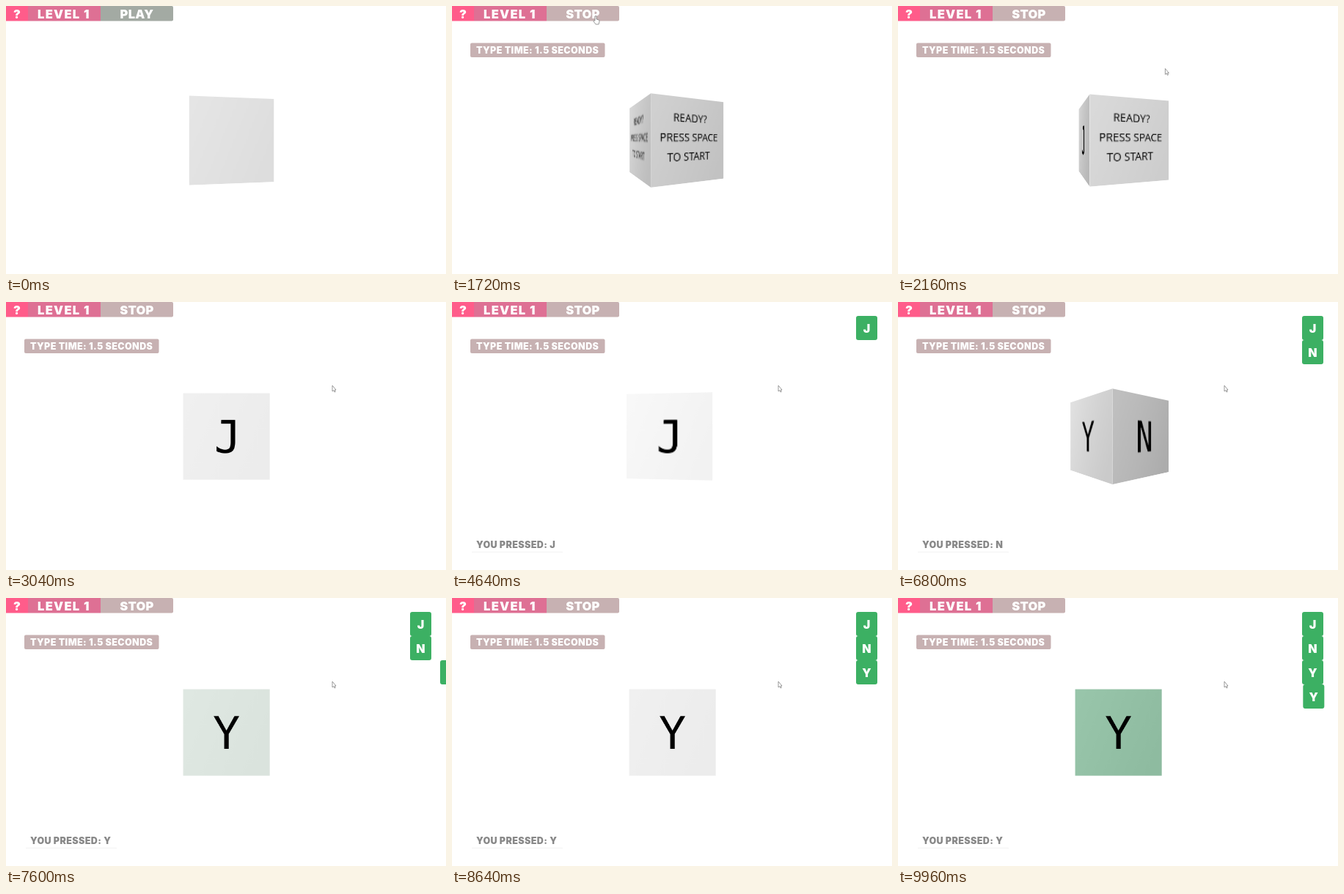
An HTML page with a canvas that plays this animation: 600x366 px, repeating every 10 s.

```html
<!DOCTYPE html>
<html lang="en">
<head>
<meta charset="utf-8">
<title>Typing cube</title>
<style>
  html, body { margin: 0; width: 100%; height: 100%; overflow: hidden; background: #fff; }
  #scene { position: absolute; left: 0; top: 0; width: 600px; height: 366px; overflow: hidden;
    perspective: 243px; perspective-origin: 300px 183px; }
  .face { position: absolute; left: 252.5px; top: 135.5px; width: 95px; height: 95px; backface-visibility: hidden; }
  #ui { position: absolute; left: 0; top: 0; }
</style>
</head>
<body>
<div id="scene">
  <canvas class="face" width="196" height="196"></canvas>
  <canvas class="face" width="196" height="196"></canvas>
</div>
<canvas id="ui" width="600" height="366"></canvas>
<script>
const LOOP = 10000, CLICK = 1560, TURN = 500, REST_ANGLE = 9;
const READY = 'READY?|PRESS SPACE|TO START ';
const GREEN = '#3cb063', PINK_GREY = '#c7b1b2';

// dir 1 turns the cube to the right, -1 to the left
const turns = [
  { at: 1640, dir: 1, from: READY, to: READY, start: REST_ANGLE },
  { at: 2080, dir: 1, from: READY, to: 'J' },
  { at: 4605, dir: -1, from: 'J', to: 'N' },
  { at: 6668, dir: 1, from: 'N', to: 'Y' },
  { at: 8650, dir: -1, from: 'Y', to: 'Y' }
];
const presses = [[3920, 'J'], [5480, 'N'], [7560, 'Y'], [9560, 'Y']];
const pointerPath = [
  [320, 594, 232], [720, 390, 96], [1040, 140, 16], [1320, 196, 14],
  [1760, 196, 14], [2520, 507, 146], [2960, 445, 114]
];

const faces = [...document.querySelectorAll('.face')];
const ui = document.getElementById('ui').getContext('2d');
const clamp = v => Math.max(0, Math.min(1, v));
const smooth = p => p * p * (3 - 2 * p);

// cubic-bezier(.25, .1, .25, 1)
function ease(x) {
  if (x <= 0 || x >= 1) return clamp(x);
  let lo = 0, hi = 1, u;
  for (let i = 0; i < 24; i++) {
    u = (lo + hi) / 2;
    const bx = .75 * u * (1 - u) + u ** 3;
    if (bx < x) lo = u; else hi = u;
  }
  return .3 * (1 - u) ** 2 * u + 3 * (1 - u) * u * u + u ** 3;
}

function drawLetter(g, letter) {
  const baseline = 18.5;
  g.font = '51px "DejaVu Sans Mono", monospace';
  if (letter === 'J') {
    g.textAlign = 'left';
    g.fillText('J', 10 - g.measureText('J').actualBoundingBoxRight, baseline);
    g.fillRect(-6, -18.7, 15, 4.3);
  } else {
    g.textAlign = 'center';
    g.fillText(letter, 0, baseline);
  }
}

function drawFace(canvas, angle, text, flash, blur) {
  canvas.style.transform = `rotateY(${angle}deg) translateZ(47.5px)`;
  const g = canvas.getContext('2d');
  g.setTransform(2, 0, 0, 2, 98, 98);
  const lean = angle + 6;
  const tone = 246 - (lean > 0 ? 1.4 : .75) * Math.abs(lean);
  const spread = 2 + 12 * Math.abs(Math.sin(angle * Math.PI / 180));
  const shade = g.createLinearGradient(-49, -20, 49, 20);
  [1, -1].forEach((side, i) => {
    const mix = [145, 191, 163].map(c =>
      Math.round(tone + (c - tone) * flash + side * (spread + 3 * flash)));
    shade.addColorStop(i, `rgb(${mix})`);
  });
  g.fillStyle = shade;
  g.fillRect(-49, -49, 98, 98);
  g.fillStyle = '#000';
  if (text.length === 1) return drawLetter(g, text);
  g.filter = blur > .05 ? `blur(${blur * 2}px)` : 'none';
  g.font = '13px "Open Sans", "Noto Sans", sans-serif';
  g.textAlign = 'center';
  text.split('|').forEach((line, i) => g.fillText(line, 0, -21 + i * 22));
  g.filter = 'none';
}

function drawCube(t) {
  let angle = REST_ANGLE, front = t < CLICK ? '' : READY, next = null;
  turns.forEach((turn, i) => {
    if (t < turn.at) return;
    const p = (t - turn.at) / TURN, start = turn.start || 0;
    const following = turns[i + 1];
    if (p >= 1 || (following && t >= following.at)) {
      angle = 0; front = turn.to; next = null;
    } else {
      angle = turn.dir * (start + (90 - start) * ease(p));
      front = turn.from;
      next = { angle: angle - turn.dir * 90, text: turn.to, blur: 1 - ease(p) };
    }
  });
  const press = presses.filter(([at]) => t >= at).pop();
  const age = press ? t - press[0] : LOOP;
  const flash = age < 700 ? Math.sin(Math.PI * age / 700) : 0;
  drawFace(faces[0], angle, front, flash, 0);
  faces[1].style.display = next ? 'block' : 'none';
  if (next) drawFace(faces[1], next.angle, next.text, 0, next.blur);
}

function box(x, y, w, h, color, radius = 0) {
  ui.fillStyle = color;
  ui.beginPath();
  ui.roundRect(x, y, w, h, radius);
  ui.fill();
}

function label(text, x, y, size, color = '#fff', spacing = 0, align = 'left') {
  ui.font = `900 ${size}px Inter, "Open Sans", sans-serif`;
  ui.letterSpacing = spacing + 'px';
  ui.textAlign = align;
  ui.fillStyle = color;
  ui.fillText(text, x, y);
}

function drawBar(t) {
  const playing = t >= CLICK;
  box(0, 0, 30, 20.5, '#ff5c8a');
  box(30, 0, 99, 20.5, '#de7094');
  box(129, 0, 99, 20.5, playing ? PINK_GREY : '#a3aaa3', [0, 2, 2, 0]);
  label('?', 15, 17, 16.5, '#fff', 0, 'center');
  label('LEVEL 1', 43, 17, 16.5, '#fff', 1.3);
  label(playing ? 'STOP' : 'PLAY', 178.5, 17, 16.5, '#fff', .3, 'center');
  if (!playing) return;
  const p = clamp((t - CLICK + 40) / 160);
  ui.save();
  ui.globalAlpha = p;
  ui.translate(-12 * (1 - p), 0);
  box(25, 50.5, 183.5, 19.5, PINK_GREY, 2);
  label('TYPE TIME: 1.5 SECONDS', 33, 65, 12.5, '#fff', .4);
  ui.restore();
}

function drawPresses(t) {
  const done = presses.filter(([at]) => t >= at);
  done.forEach(([at, letter], i) => {
    const left = 1 - clamp((t - at) / 480);
    const x = 551 + 49 * left * left, y = 19 + 33 * i;
    box(x, y, 29, 33, GREEN, 3);
    label(letter, x + 14.5, y + 22.5, 16, '#fff', 0, 'center');
  });
  if (!done.length) return;
  const [at, letter] = done[done.length - 1];
  ui.globalAlpha = done.length === 1 ? clamp((t - at + 40) / 200) : 1;
  label('YOU PRESSED: ' + letter, 33, 336, 12.5, '#888', .4);
  box(27, 341, 124, 1, '#f3f3f3');
  ui.globalAlpha = 1;
}

function drawPointer(t) {
  if (t < pointerPath[0][0]) return;
  const last = pointerPath[pointerPath.length - 1];
  let [, x, y] = last;
  const i = pointerPath.findIndex(point => point[0] > t);
  if (i > 0) {
    const [t0, x0, y0] = pointerPath[i - 1], [t1, x1, y1] = pointerPath[i];
    const p = smooth((t - t0) / (t1 - t0));
    x = x0 + (x1 - x0) * p;
    y = y0 + (y1 - y0) * p;
  }
  const hand = y < 20 && x > 129 && x < 228;
  const shape = hand
    ? 'M-1 0Q0-1 1 0V4L4 5Q5 5 5 7L4 11H0L-3 7Q-3 5-1 6Z'
    : 'M0 0V8L1.8 6.5 3 9 4.2 8.5 3.2 6H5Z';
  ui.save();
  ui.translate(x, y);
  const path = new Path2D(shape);
  ui.fillStyle = '#fff';
  ui.strokeStyle = '#808080';
  ui.lineWidth = .8;
  ui.fill(path);
  ui.stroke(path);
  ui.restore();
}

const begin = performance.now();
function render() {
  const t = (performance.now() - begin) % LOOP;
  ui.clearRect(0, 0, 600, 366);
  drawCube(t);
  drawBar(t);
  drawPresses(t);
  drawPointer(t);
  requestAnimationFrame(render);
}
render();
</script>
</body>
</html>
```
